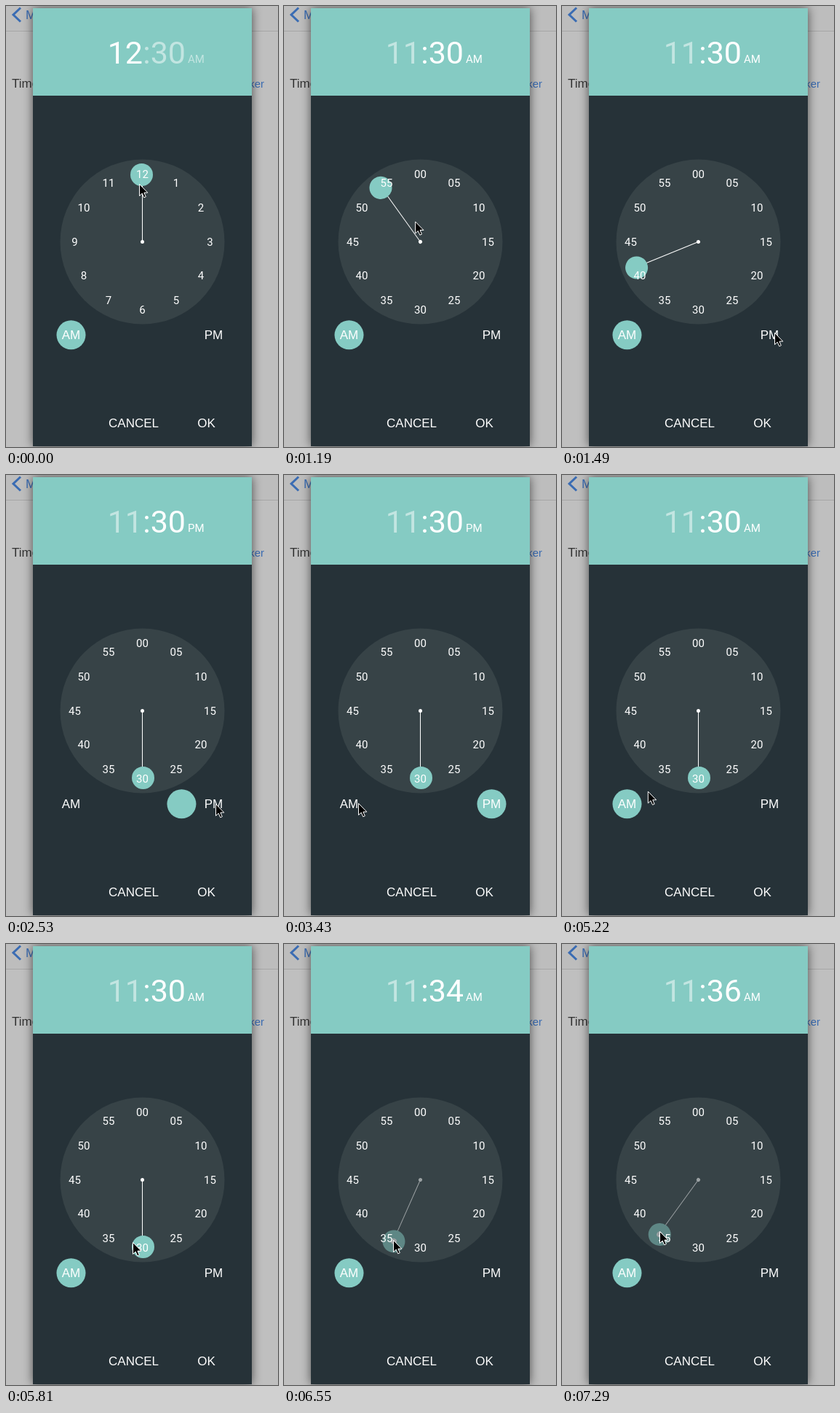
An HTML page that plays this animation: 374 px wide and 605 px high, repeating every 8 s.

```html
<!DOCTYPE html>
<html lang="en">
<head>
<meta charset="utf-8">
<title>Time picker</title>
<style>
html, body { margin: 0; height: 100%; overflow: hidden; background: #bfbfbf; }
svg { display: block; }
text { font: 17px "Liberation Sans", Arial, sans-serif; fill: #fff; }
.page { fill: #333; }
.link { fill: #3a6cb3; }
.mid { text-anchor: middle; }
.digits text { font: 15px Roboto, sans-serif; text-anchor: middle; }
.time text { font: 43px Roboto, sans-serif; text-anchor: end; }
.time #half { font-size: 15px; text-anchor: start; }
.teal { fill: #85cbc3; }
</style>
</head>
<body>
<svg width="374" height="605" viewBox="0 0 374 605">
  <rect width="374" height="605" fill="#bfbfbf"/>
  <rect width="374" height="34" fill="#bdbdbd"/>
  <rect y="34" width="374" height="1" fill="#a6a6a6"/>
  <path d="M20 2.500L10 12L20 21.500" fill="none" stroke="#3a6cb3" stroke-width="3"/>
  <text class="link" x="27" y="18">M</text>
  <text class="page" x="8" y="112">Time</text>
  <text class="link" x="355" y="112" text-anchor="end" style="font-size:15px">ker</text>

  <rect x="37" y="3" width="301" height="601" fill="#263238" style="filter:drop-shadow(0 0 7px #0009)"/>
  <rect class="teal" x="37" y="3" width="301" height="120"/>
  <g class="time">
    <text id="hour" x="188" y="78.500"></text>
    <g id="rest">
      <text id="minute" x="247" y="78.500"></text>
      <text id="half" x="250" y="78"></text>
    </g>
  </g>

  <circle cx="187.500" cy="323.500" r="113" fill="#374347"/>
  <g id="hand">
    <path d="M0 0V-77" stroke="#fff"/>
    <circle r="2.500" fill="#fff"/>
    <circle class="teal" cx="-1" cy="-92" r="15.500"/>
    <circle id="grip" cx="-1" cy="-92" r="4" fill="#fff"/>
  </g>
  <g class="digits" id="digits"></g>

  <circle id="toggle" class="teal" cy="451.300" r="20"/>
  <g class="mid">
    <text x="89.500" y="457">AM</text>
    <text x="285.500" y="457">PM</text>
    <text x="175.500" y="578">CANCEL</text>
    <text x="275.500" y="578">OK</text>
  </g>
  <path id="cursor" d="M.5 -.5V15.500L4.200 12.100L6.700 17.800L9.300 16.700L6.900 11.100H11.800Z" fill="#000" stroke="#fff"/>
</svg>
<script>
const LOOP = 8000, TICK = 148.7;
const $ = id => document.getElementById(id);
const linear = p => p;
const smooth = p => p * p * (3 - 2 * p);

// Runs through moves of [start tick, end tick, goal], beginning at value.
function follow(n, value, moves, ease = linear) {
  for (const [start, end, goal] of moves) {
    const p = Math.min(1, Math.max(0, (n - start) / (end - start)));
    value += (goal - value) * ease(p);
  }
  return value;
}

const turns = [[0, 1, 330], [7.85, 11.78, 180], [42, 44, 204], [46, 49, 216]];
const slides = [[16, 17.29, 285.5], [24.95, 26.24, 89.5]];
const trip = [
  [0, 1, 141, 243],      // drag the hour
  [7, 10, 292, 449],     // to PM
  [16, 17, 288, 452],
  [20, 23, 102, 451],    // to AM
  [34, 37, 163, 388],    // to the minute knob
  [37, 39, 174, 410],
  [39, 42, 181, 414],
  [42, 44, 150, 407],    // drag the minutes
  [46, 49, 134, 395]
];
const tripX = trip.map(([start, end, x]) => [start, end, x]);
const tripY = trip.map(([start, end, , y]) => [start, end, y]);

const labels = Array.from({ length: 12 }, (_, i) => {
  const label = document.createElementNS("http://www.w3.org/2000/svg", "text");
  const a = i * Math.PI / 6;
  label.setAttribute("x", 187.5 + 93 * Math.sin(a));
  label.setAttribute("y", 323.5 - 93 * Math.cos(a) + 5.3);
  return $("digits").appendChild(label);
});

function draw(ms) {
  const n = Math.floor(ms / TICK);  // the screen refreshes once per tick
  const minutes = n >= 8, dragging = n >= 43;
  const angle = follow(n, 360, turns);
  const x = follow(n, 183, tripX, smooth), y = follow(n, 245, tripY, smooth);

  $("hour").textContent = n < 1 ? 12 : 11;
  $("minute").textContent = ":" + (dragging ? Math.round(angle / 6) : 30);
  $("half").textContent = n >= 17 && n < 25 ? "PM" : "AM";
  $("hour").setAttribute("opacity", minutes ? 0.5 : 1);
  $("rest").setAttribute("opacity", minutes ? 1 : 0.5);

  labels.forEach((label, i) => {
    label.textContent = minutes ? String(i * 5).padStart(2, "0") : i || 12;
  });
  $("hand").setAttribute("transform", `translate(187.5 323.5) rotate(${angle})`);
  $("hand").setAttribute("opacity", dragging ? 0.5 : 1);
  $("grip").setAttribute("opacity", dragging ? 1 : 0);
  $("toggle").setAttribute("cx", follow(n, 89.5, slides));
  $("cursor").setAttribute("transform", `translate(${x} ${y})`);
}

const start = performance.now();
function loop(now) {
  draw(Math.max(0, now - start) % LOOP);
  requestAnimationFrame(loop);
}
draw(0);
requestAnimationFrame(loop);
</script>
</body>
</html>
```
